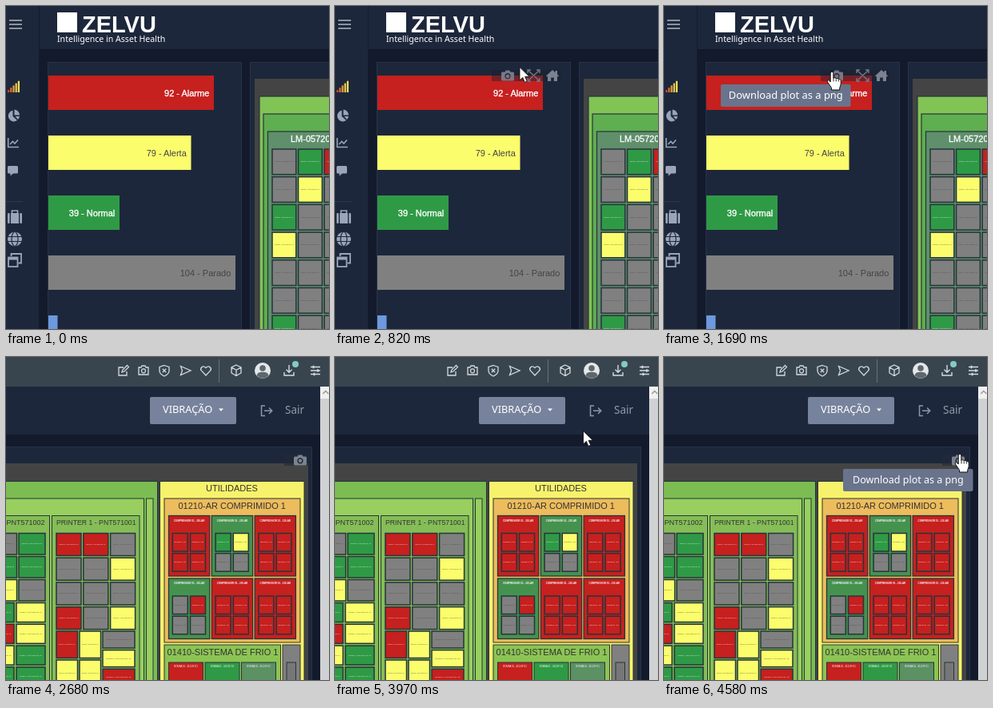
Write an HTML page that moves like this. It is 404x404 px and loops after 5.7 s.

```html
<!DOCTYPE html>
<html lang="pt">
<head>
<meta charset="utf-8">
<title>Dashboard</title>
<style>
html, body { margin: 0; width: 100%; height: 100%; overflow: hidden; background: #131a2b; }
svg { display: block; width: 100vw; height: 100vh; }
text { white-space: pre; }
.plot { font-family: "Liberation Sans", Arial, sans-serif; }
.ui { font-family: "Noto Sans", "Open Sans", sans-serif; }
</style>
</head>
<body>
<svg id="stage" viewBox="0 0 404 404" xmlns="http://www.w3.org/2000/svg"></svg>
<script>
const LOOP = 5700, CUT = 2680;
const RED = '#c6201f', YEL = '#fbfd6c', GRN = '#2f9a46', GRY = '#808080', EDGE = '#26343b';
const NAVY = '#1d273b', NIGHT = '#131a2b', ICON = '#9aa5b9';
const shade = { r: RED, y: YEL, g: GRN, k: GRY };

// x1, y1, x2, y2
const box = (a, b, c, d, fill, edge, extra = '') =>
  `<rect x="${a}" y="${b}" width="${c - a}" height="${d - b}" fill="${fill}"` +
  (edge ? ` stroke="${edge}"` : '') + ` ${extra}/>`;
const text = (x, y, size, fill, str, extra = '', font = 'plot') =>
  `<text class="${font}" x="${x}" y="${y}" font-size="${size}" fill="${fill}" ${extra}>${str}</text>`;
const line = (d, color, w = 1.3, extra = '') =>
  `<path d="${d}" fill="none" stroke="${color}" stroke-width="${w}" ${extra}/>`;
const solid = (d, fill, extra = '') => `<path d="${d}" fill="${fill}" ${extra}/>`;
const at = (x, y, body) => `<g transform="translate(${x} ${y})">${body}</g>`;
const MID = 'text-anchor="middle"', END = 'text-anchor="end"';

// Small label centred on a point, sized to about w wide
function tiny(x, y, w, fill, str) {
  const size = (w / (str.length * 0.61)).toFixed(2);
  return text(x, y, size, fill, str, MID);
}

function cell(a, b, c, d, key, label = 'MOTOR 01 - LADO ACOPLADO - M1') {
  const ink = key === 'y' || key === 'k' ? '#4a4a4a' : '#fff';
  return box(a, b, c, d, shade[key], EDGE, 'stroke-width="1.5"') +
    tiny((a + c) / 2, (b + d) / 2 + 0.5, (c - a) * 0.82, ink, label);
}

const camera = (x, y, fill) => at(x, y, solid(
  'M1.5 2H4.6L5.6 0H10.4L11.4 2H14.5Q16 2 16 3.5V11.5Q16 13 14.5 13H1.5Q0 13 0 11.5V3.5Q0 2 1.5 2Z' +
  'M8 3.6a3.7 3.7 0 1 0 .01 0Z', fill, 'fill-rule="evenodd"') +
  `<circle cx="8" cy="7.3" r="2.2" fill="${fill}"/>`);

function tooltip(id, x, y, size, weight) {
  return `<g id="${id}">` + box(x, y, x + 162.5, y + 28, '#69748c', '', 'rx="2"') +
    text(x + 81.3, y + 18.4, size, '#fff', 'Download plot as a png',
      `${MID} font-weight="${weight}"`, 'ui') + '</g>';
}

function sidebar() {
  let s = box(0, 0, 41, 404, NAVY) + box(41, 0, 42, 404, '#141c2d');
  s += line('M4 18H20M4 23H20M4 28H20', '#8b93a1', 1.8);
  ['#d8452f', '#e0702f', '#e8a23a', '#f0cc48', '#f4e35a'].forEach((c, i) => {
    s += box(2 + i * 3.2, 105 - i * 2.8, 4.2 + i * 3.2, 108, c);
  });
  s += solid('M8.5 130.5V138L14 143A7 7 0 1 1 8.5 130.5Z', ICON);
  s += solid('M10.5 129.5A7 7 0 0 1 17 136.5H10.5ZM11.5 138H17A7 7 0 0 1 15 142Z', ICON);
  s += line('M2.7 165V176.5H16M5 173L8.5 169.5 11 172 15 167.5', ICON, 1.6);
  s += solid('M3.5 200H13.5Q15 200 15 201.5V208Q15 209.5 13.5 209.5H9L5.5 212.5V209.5H3.5Q2 209.5 2 208V201.5Q2 200 3.5 200Z', ICON);
  s += box(0, 244, 21, 245, '#2c374c');
  s += box(2, 259, 4.7, 272, ICON, '', 'rx="1"') + box(6, 259, 16, 272, ICON) +
    box(17.3, 259, 20, 272, ICON, '', 'rx="1"') + line('M7.5 259V256H14.5V259', ICON, 1.7);
  s += '<circle cx="11" cy="291.5" r="9" fill="' + ICON + '"/>' +
    line('M2 288.5H20M2 294.5H20', NAVY, 1.2) +
    `<ellipse cx="11" cy="291.5" rx="4" ry="9" fill="none" stroke="${NAVY}" stroke-width="1.2"/>`;
  s += line('M6.5 313V310H19V321.5H15.5', ICON, 1.8) +
    box(3, 314.5, 14.5, 326, 'none', ICON, 'stroke-width="1.8"') + box(3, 314, 14.5, 317.5, ICON);
  return s;
}

function barPlot() {
  const white = 'stroke="#fff" stroke-width=".35"';
  const bars = [
    [260, RED, '92 - Alarme', '#fff', white], [231.5, YEL, '79 - Alerta', '#444', ''],
    [142, GRN, '39 - Normal', '#fff', white], [287, GRY, '104 - Parado', '#444', ''],
    [64.5, '#6c99e0', '', '#fff', '']
  ];
  let s = box(52.5, 70.5, 294.5, 410, NAVY, '#27334a');
  bars.forEach(([end, fill, str, ink, extra], i) => {
    const y = 87 + i * 75;
    s += box(53, y, end, y + 43, fill) + text(end - 5.7, y + 26, 11, ink, str, `${END} ${extra}`);
  });
  return s;
}

function treeLeft() {
  let s = box(305.5, 70.5, 410, 410, NAVY, '#27334a') + box(311, 91, 410, 410, '#444');
  [[317, 113, '#82c355'], [322, 135, '#5fae50'], [327.5, 157, '#5f8f6b']].forEach(([x, y, c]) => {
    s += box(x, y, 420, 420, c, EDGE, 'stroke-width="1.2"');
  });
  s += text(356, 170, 11, '#fff', 'LM-05720', 'stroke="#fff" stroke-width=".3"');
  ['kgr', 'kyk', 'gkk', 'ykk', 'kkk', 'kkk', 'gkk'].forEach((row, j) => {
    [...row].forEach((key, i) => {
      const x = 333 + i * 32.6, y = 179 + j * 34.7;
      s += cell(x, y, x + 29.8, y + 31.7, key);
    });
  });
  return s;
}

function leftTools() {
  const c = '#727a89';
  return '<g id="tools">' + box(196, 80, 282, 94, '#1a2030', '', 'opacity=".45"') +
    camera(208, 80.5, c) +
    line('M241 84V80H245M252 80H256V84M256 90V94H252M245 94H241V90M242 81L255 93M255 81L242 93', c, 1.4) +
    solid('M264 87.5L272 80 275.5 83.2V81H278V85.6L280 87.5 279 88.6 278 87.8V94H273.8V89.5H270.2V94H266V87.8L265 88.6Z', '#7b8392') +
    '</g>';
}

function sceneA() {
  let s = box(0, 0, 404, 404, NIGHT) + box(42, 0, 404, 54, NAVY) + box(42, 54, 404, 55, '#101726');
  s += sidebar();
  s += box(64, 8, 89, 33, '#fff');
  s += text(95, 33, 29, '#fff', 'ZELVU', 'font-weight="700"');
  s += text(64, 45, 10.6, '#fff', 'Intelligence in Asset Health', '', 'ui');
  s += barPlot() + treeLeft() + leftTools() + tooltip('tipA', 71, 98, 12.9, 400);
  s += '<circle id="press" cx="210" cy="82" r="12" fill="#fff" opacity=".25"/>';
  return s;
}

function browserBar() {
  const c = '#d5dade';
  let s = box(0, 0, 404, 37, '#39454e');
  s += line('M147 13H141V23H151V18M145 19L146 16 151.5 10.5 153.5 12.5 148 18Z', c);
  s += line('M166 13H169L170 11H174L175 13H178V22H166Z', c) +
    `<circle cx="172" cy="17.3" r="2.5" fill="none" stroke="${c}" stroke-width="1.2"/>`;
  s += line('M198 10.5L204 12.5V17Q204 21.5 198 24 192 21.5 192 17V12.5ZM195.8 14.8L200.2 19.2M200.2 14.8L195.8 19.2', c);
  s += line('M218.5 11.5L231 17 218.5 22.5 220.5 17Z', c);
  s += line('M250 23L244.5 17.2C242 14 246 9.5 250 13.5 254 9.5 258 14 255.5 17.2Z', c);
  s += box(266, 3, 267, 32, '#66717a');
  s += line('M288 10L294 13V20L288 23.5 282 20V13ZM282 13L288 16.3 294 13M288 16.3V23.5', c);
  s += '<circle cx="321" cy="17" r="10" fill="#e4e7e9"/><circle cx="321" cy="14" r="3.8" fill="#5c6870"/>' +
    solid('M313.5 23.2Q314 18.8 321 18.8 328 18.8 328.5 23.2 321 30.5 313.5 23.2Z', '#5c6870');
  s += line('M354 10V19M350.5 15.8L354 19.3 357.5 15.8M348 19V23H360V19', c, 1.4) +
    '<circle cx="362" cy="9" r="4" fill="#82cbc5"/>';
  s += line('M381 12.5H393M381 17H393M381 21.5H393', c) +
    line('M384.5 10.8V14.2M390 15.3V18.7M385.5 19.8V23.2', c, 1.8);
  return s;
}

function pageHeader() {
  let s = box(0, 37, 393, 97, NAVY) + box(180, 50, 288, 84, '#77839c', '', 'rx="2"');
  s += text(196, 70, 12.8, '#fff', 'VIBRAÇÃO', 'font-weight="500"', 'ui');
  s += solid('M266 64.5H272L269 67.8Z', '#fff');
  s += line('M324 61H319.5V73.5H324M323 67.2H332.5M329 63.5L332.7 67.2 329 71', '#8d97a8', 1.5);
  s += text(349, 71, 13.5, '#929bab', 'Sair', '', 'ui');
  s += box(393, 37, 404, 404, '#d0d1d3') + box(393, 37, 404, 52, '#f1f1f1') +
    line('M396.3 46L399.8 42.5 403.3 46', '#999', 1.5);
  return s;
}

function printers() {
  let s = box(-5, 155.5, 189.5, 410, '#7bbd52', EDGE) + box(-5, 177, 172.5, 410, '#98cf5e', EDGE) +
    box(175.5, 177, 184, 410, '#98cf5e', EDGE);
  s += box(-5, 198.5, 54.5, 410, '#85bd57', EDGE) + box(57.5, 198.5, 167, 410, '#85bd57', EDGE);
  s += text(0.5, 210, 9, '#333', 'PNT571002') + text(63, 210, 8.7, '#333', 'PRINTER 1 - PNT571001');
  ['kg', 'gg', 'yk'].forEach(([a, b], j) => {
    const y = 220.5 + j * 29;
    s += cell(-16, y, 13.5, y + 26.5, a) + cell(16, y, 49, y + 26.5, b);
  });
  ['gy', 'ry', 'yg', 'gg'].forEach(([a, b], j) => {
    const y = 307.5 + j * 26.8;
    s += cell(-22, y, 10, y + 24, a) + cell(13, y, 49, y + 24, b);
  });
  ['rrk', 'kky', 'kkk', 'rky'].forEach((row, j) => {
    [...row].forEach((key, i) => {
      const x = 63 + i * 33.8, y = 220.5 + j * 30.7;
      s += cell(x, y, x + 31, y + 28, key);
    });
  });
  s += cell(63, 343, 89.5, 376.5, 'r') + cell(92, 343, 118.5, 376.5, 'y');
  s += cell(63, 379, 89.5, 412, 'y') + cell(92, 379, 118.5, 412, 'y');
  ['k', 'y', 'r'].forEach((key, j) => {
    s += cell(121, 343 + j * 23.6, 161, 364 + j * 23.6, key);
  });
  return s;
}

function utilities() {
  const cards = [['rrrr', 'gykk', 'rrrr'], ['krkk', 'rrrr', 'rrrr']];
  let s = box(192.5, 155.5, 373, 410, '#f7f26c', EDGE) + text(282.5, 168, 11, '#333', 'UTILIDADES', MID);
  s += box(198, 177, 368, 357, '#edbc5c', EDGE) + text(282.7, 190, 11, '#333', '01210-AR COMPRIMIDO 1', MID);
  cards.forEach((row, j) => row.forEach((keys, i) => {
    const x = 203.5 + i * 53.8, y = 198.5 + j * 78.5;
    s += box(x, y, x + 51.3, y + 75.5, keys === 'rrrr' ? '#c6201f' : '#45924f', EDGE, 'stroke-width="1.3"');
    s += `<g font-weight="700">${tiny(x + 25.7, y + 7, 40, '#fff', 'COMPRESSOR 01 - 210-AR')}</g>`;
    [...keys].forEach((key, n) => {
      const cx = x + 4.8 + (n % 2) * 22.2, cy = y + 22 + (n >> 1) * 25.2;
      s += cell(cx, cy, cx + 19, cy + 22.5, key, 'MOTOR 01 - M1');
    });
  }));
  s += box(198, 360, 343.5, 410, '#8cc454', EDGE) + text(271, 373, 11, '#333', '01410-SISTEMA DE FRIO 1', MID);
  [RED, GRN, '#5b9163'].forEach((c, i) => {
    const x = 203.5 + i * 45.5;
    s += box(x, 382, x + 43, 410, c, EDGE) + tiny(x + 21.5, 387.5, 34, '#fff', 'BOMBA 01 - 410-SF-01');
  });
  s += box(346, 360, 368, 410, '#808080', EDGE) + box(351, 382, 362.5, 410, '#777', EDGE);
  return s;
}

function sceneB() {
  return box(0, 0, 404, 404, NIGHT) + browserBar() + box(-5, 112.5, 382.5, 410, NAVY, '#27334a') +
    box(0, 133, 378, 404, '#444') + printers() + utilities() + pageHeader() +
    '<g id="snap">' + box(348, 121.5, 378, 136, '#232938', '', 'opacity=".6"') +
    camera(360, 122.5, '#7b8390') + '</g>' + tooltip('tipB', 224, 140, 12.5, 500);
}

const stage = document.getElementById('stage');
stage.innerHTML = `<g id="a">${sceneA()}</g><g id="b">${sceneB()}</g>` +
  '<g id="cursor" stroke="#111" stroke-linejoin="round">' +
  solid('M0 0V16.5L3.8 12.9 6.3 18.9 9.3 17.7 6.7 11.8H12Z', '#fff', 'id="arrow" stroke-width=".9"') +
  '<g id="hand">' +
  solid('M-1.8 1.5A1.8 1.8 0 0 1 1.8 1.5V8C2.4 6.8 5 7 5.2 8.6 5.8 7.6 8.2 7.8 8.4 9.4 9.1 8.6 11.2 9 11.2 10.8V15C11.2 17 9.9 18.5 9.7 20V22.5H-.5V20C-1.5 18-4 15-5.5 12.5-6.5 10.9-4.7 9.5-3.3 10.8L-1.8 12.5Z', '#fff') +
  line('M2 8V12M5.2 9V12M8.4 9.8V12', '#111', 0.9) + '</g></g>';

const el = id => document.getElementById(id);
const show = (id, on) => { el(id).style.display = on ? '' : 'none'; };
const fade = (t, start, len) => Math.max(0, Math.min(1, (t - start) / len));

// Pointer runs: start time, last step time, tip positions
const runs = [
  [330, 890, [[396, 92], [358, 85], [320, 79], [284, 76], [267, 71], [253, 70], [241, 72], [231, 76.5], [219, 80]]],
  [960, 1020, [[214, 81.5], [210, 82.5]]],
  [3470, 4040, [[46, 110], [96, 104], [144, 99], [189, 95], [229, 92], [262, 91], [288, 91], [310.5, 92.5], [328, 99]]],
  [4110, 4580, [[343, 106], [355, 113], [363, 117], [367, 119], [369, 120], [370, 121], [370, 121.5], [370, 121.5]]]
];

function pointer(t) {
  const run = runs.filter(r => r[0] <= t && (t < CUT || r[0] > CUT)).pop();
  if (!run) return null;
  const [from, to, pts] = run, n = pts.length - 1;
  return pts[Math.min(n, Math.floor((t - from) / (to - from) * n + 0.01))];
}

function draw(t) {
  const first = t < CUT, tip = pointer(t);
  const hover = first ? t >= 890 : t >= 4244;
  show('a', first);
  show('b', !first);
  show('cursor', tip);
  if (tip) el('cursor').setAttribute('transform', `translate(${tip[0]} ${tip[1]})`);
  show('arrow', !hover);
  show('hand', hover);
  show('tipA', hover);
  show('tipB', hover);
  show('press', t >= 1620 && t < 1690);
  el('tools').setAttribute('opacity', fade(t, 530, 280));
  el('snap').setAttribute('opacity', t < 4110 ? 1 - fade(t, 3450, 280) : fade(t, 4090, 280));
}

let start = null;
function tick(now) {
  if (start === null) start = now;
  draw((now - start) % LOOP);
  requestAnimationFrame(tick);
}
draw(0);
requestAnimationFrame(tick);
</script>
</body>
</html>
```
